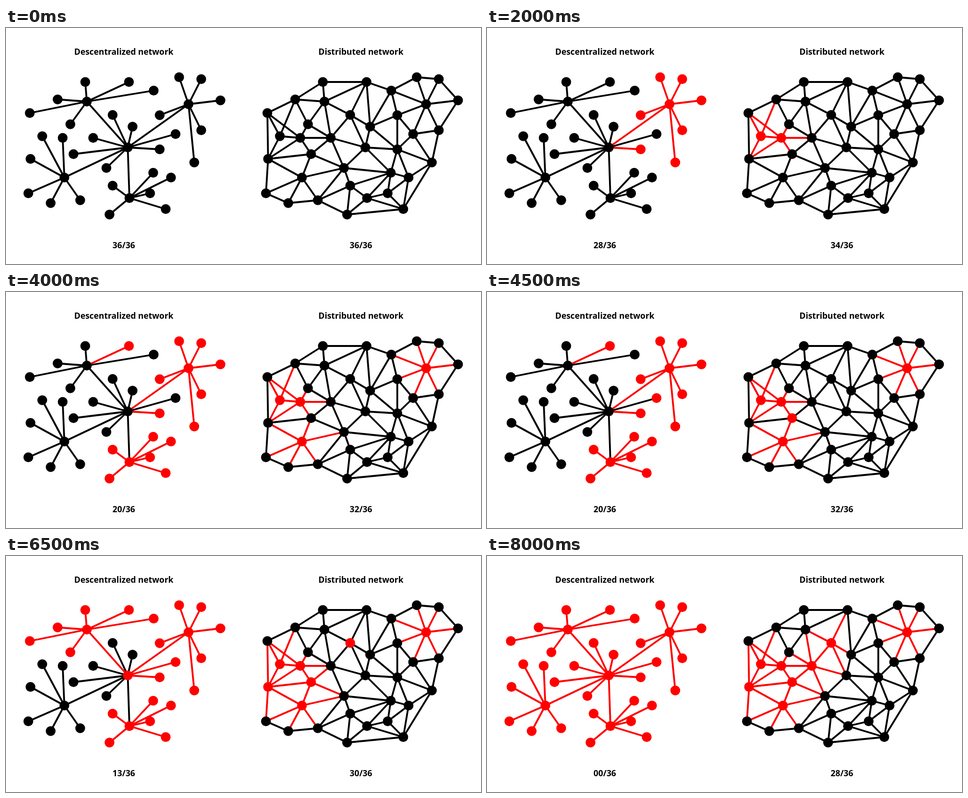
Write an HTML page with a canvas that moves like this. It is 989 by 494 pixels and loops after 9500 ms.

```html
<!DOCTYPE html>
<html lang="en">
<head>
<meta charset="utf-8">
<title>Network resilience</title>
<style>
  html, body { margin: 0; width: 100%; height: 100%; overflow: hidden; background: #fff; }
  canvas { display: block; }
</style>
</head>
<body>
<canvas id="stage" width="989" height="494"></canvas>
<script>
const ctx = document.getElementById('stage').getContext('2d');
const LOOP = 9500, STEP = 1000, HIT = 500;
const BLACK = '#000', RED = '#f00';
const SHIFT = 494.7;      // distance between the two copies of the layout
const MIN_HEIGHT = 24;    // flatter triangles are left out of the mesh

// Both networks share these nodes: each hub is followed by its leaves.
const clusters = [
  [[168.3, 154], [165, 113], [256, 113], [307.5, 131], [107.5, 149.5], [49.5, 178], [134, 201.5]],
  [[380, 159.5], [360.5, 103], [406.5, 107], [446.5, 151.5], [320, 182.5], [406.5, 214], [392, 281.5]],
  [[253.5, 250], [222, 182], [263.5, 206.5], [181.5, 230], [353, 222], [320, 254], [140.5, 264], [209, 293]],
  [[121.5, 313], [75.5, 226.5], [118, 230], [51, 274], [46.5, 346], [93, 366.5], [154.5, 360.5]],
  [[257, 356], [306.5, 303], [343.5, 313], [222, 330], [300, 346], [332.5, 379], [215.5, 390.5]]
];
const nodes = clusters.flat();
const dist = (p, q) => Math.hypot(p[0] - q[0], p[1] - q[1]);

// Links are [a, b]; with a third value only the first end can cut them.
function hubLinks() {
  const links = [], hubs = [];
  let n = 0;
  for (const group of clusters) {
    hubs.push(n);
    for (let i = 1; i < group.length; i++) links.push([n, n + i]);
    n += group.length;
  }
  const [a, b, c, d, e] = hubs;
  return [...links, [c, a], [c, b], [c, d], [c, e, true]];
}

function circumcircle([ax, ay], [bx, by], [cx, cy]) {
  const ux = bx - ax, uy = by - ay, vx = cx - ax, vy = cy - ay;
  const cross = ux * vy - uy * vx;
  const u2 = ux * ux + uy * uy, v2 = vx * vx + vy * vy;
  const x = (vy * u2 - uy * v2) / (2 * cross);
  const y = (ux * v2 - vx * u2) / (2 * cross);
  return { center: [ax + x, ay + y], r: Math.hypot(x, y), cross: Math.abs(cross) };
}

// Delaunay triangulation without flat triangles; two diagonals are turned.
function meshLinks() {
  const turned = { '6-23': [5, 24], '14-32': [21, 30] };
  const links = new Map();
  const add = (i, j) => links.set(i + '-' + j, turned[i + '-' + j] || [i, j]);
  for (let i = 0; i < nodes.length; i++)
    for (let j = i + 1; j < nodes.length; j++)
      for (let k = j + 1; k < nodes.length; k++) {
        const [p, q, s] = [nodes[i], nodes[j], nodes[k]];
        const { center, r, cross } = circumcircle(p, q, s);
        const height = cross / Math.max(dist(p, q), dist(q, s), dist(s, p));
        if (!(height > MIN_HEIGHT)) continue;
        if (nodes.some(o => dist(o, center) < r - 1e-6)) continue;
        add(i, j);
        add(j, k);
        add(i, k);
      }
  return [...links.values()];
}

const networks = [
  { title: 'Descentralized network', textX: 245.3, dx: 0, links: hubLinks(), targets: [7, 19, 29, 2, 18, 0, 14, 22] },
  { title: 'Distributed network', textX: 739, dx: SHIFT, links: meshLinks(), targets: [24, 23, 22, 7, 20, 25, 15, 17] }
];

function drawNetwork({ title, textX, dx, links, targets }, t) {
  const hit = targets.slice(0, Math.floor((t + HIT) / STEP));
  const failed = new Set(targets.slice(0, Math.floor(t / STEP)));
  const cut = ([a, b, oneWay]) => failed.has(a) || (!oneWay && failed.has(b));

  // A node is lost once it has no working link left.
  const linked = new Set(links.filter(l => !cut(l)).flatMap(([a, b]) => [a, b]));
  const lost = i => failed.has(i) || !linked.has(i);

  ctx.save();
  ctx.translate(dx, 0);
  ctx.lineWidth = 3.8;
  for (const red of [false, true]) {
    ctx.strokeStyle = red ? RED : BLACK;
    ctx.beginPath();
    for (const l of links) {
      if (cut(l) !== red) continue;
      ctx.moveTo(...nodes[l[0]]);
      ctx.lineTo(...nodes[l[1]]);
    }
    ctx.stroke();
  }

  let alive = 0;
  nodes.forEach(([x, y], i) => {
    if (!lost(i)) alive++;
    ctx.fillStyle = lost(i) || hit.includes(i) ? RED : BLACK;
    ctx.beginPath();
    ctx.arc(x, y, 10.2, 0, Math.PI * 2);
    ctx.fill();
  });
  ctx.restore();

  ctx.fillStyle = BLACK;
  ctx.fillText(title, textX, 56);
  ctx.fillText(String(alive).padStart(2, '0') + '/' + nodes.length, textX, 461);
}

function frame(now) {
  const t = now % LOOP;
  ctx.fillStyle = '#fff';
  ctx.fillRect(0, 0, 989, 494);
  ctx.font = 'bold 17.4px "Noto Sans", "Open Sans", sans-serif';
  ctx.textAlign = 'center';
  for (const net of networks) drawNetwork(net, t);
  requestAnimationFrame(frame);
}
requestAnimationFrame(frame);
</script>
</body>
</html>
```
